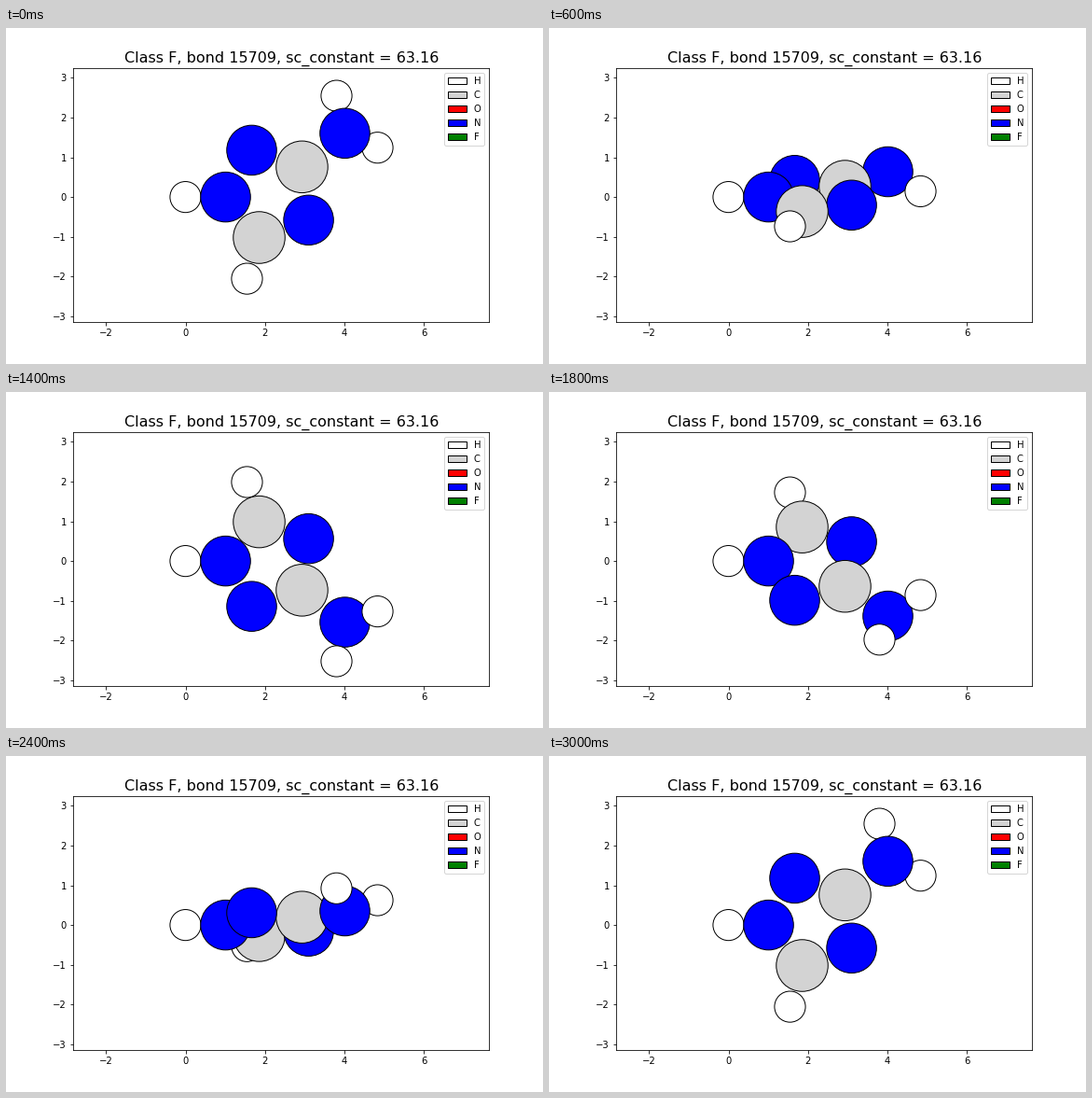
Recreate the animation shown at these times as a matplotlib script. Size 576 by 360 pixels, loop 3.2 s.

```python
import numpy as np
import matplotlib.pyplot as plt
from matplotlib.animation import FuncAnimation
from matplotlib.patches import Patch

FRAMES, INTERVAL = 16, 200
W, H, DPI = 576, 360, 72
UNIT = 42.6            # pixels per data unit
X0, Y0 = 192.5, 181.1  # pixel position of the data origin

COLORS = {"H": "white", "C": "lightgray", "O": "red", "N": "blue", "F": "green"}
RADII = {"H": 0.25, "C": 0.70, "N": 0.65}

# element, x, y, z
ATOMS = [
    ("H", 0.000, 0.000, 0.000),
    ("N", 1.010, 0.000, 0.000),
    ("N", 1.667, 1.178, -0.058),
    ("C", 2.934, 0.758, -0.039),
    ("N", 3.100, -0.580, 0.026),
    ("C", 1.855, -1.019, 0.052),
    ("N", 4.014, 1.603, -0.148),
    ("H", 3.803, 2.547, 0.143),
    ("H", 4.836, 1.242, 0.252),
    ("H", 1.549, -2.054, 0.108),
]
elements = [a[0] for a in ATOMS]
x, y, z = np.array([a[1:] for a in ATOMS]).T
sizes = np.array([4400 * RADII[e] for e in elements])
fills = np.array([COLORS[e] for e in elements])
angles = np.linspace(0, 2 * np.pi, FRAMES)

fig, ax = plt.subplots(figsize=(W / DPI, H / DPI), dpi=DPI)
fig.subplots_adjust(left=0.125, right=0.9, bottom=0.125, top=0.88)
dots = ax.scatter(x, y, s=sizes, c=fills, edgecolors="black", linewidths=1)
ax.set_xlim((0.125 * W - X0) / UNIT, (0.9 * W - X0) / UNIT)
ax.set_ylim((Y0 - 0.875 * H) / UNIT, (Y0 - 0.12 * H) / UNIT)
ax.set_xticks(range(-2, 7, 2))
ax.set_yticks(range(-3, 4))
ax.set_title("Class F, bond 15709, sc_constant = 63.16", fontsize=16)
ax.legend(
    handles=[Patch(facecolor=c, edgecolor="black", label=e) for e, c in COLORS.items()],
    loc="upper right",
)


def update(i):
    """Turn the molecule about the x axis and draw far atoms first."""
    cos, sin = np.cos(angles[i]), np.sin(angles[i])
    height = y * cos - z * sin
    depth = y * sin + z * cos
    order = np.argsort(-depth, kind="stable")
    dots.set_offsets(np.column_stack([x, height])[order])
    dots.set_sizes(sizes[order], DPI)
    dots.set_facecolors(fills[order])
    return (dots,)


anim = FuncAnimation(fig, update, frames=FRAMES, interval=INTERVAL,
                     repeat=True, repeat_delay=0, blit=False)
plt.show()
```
